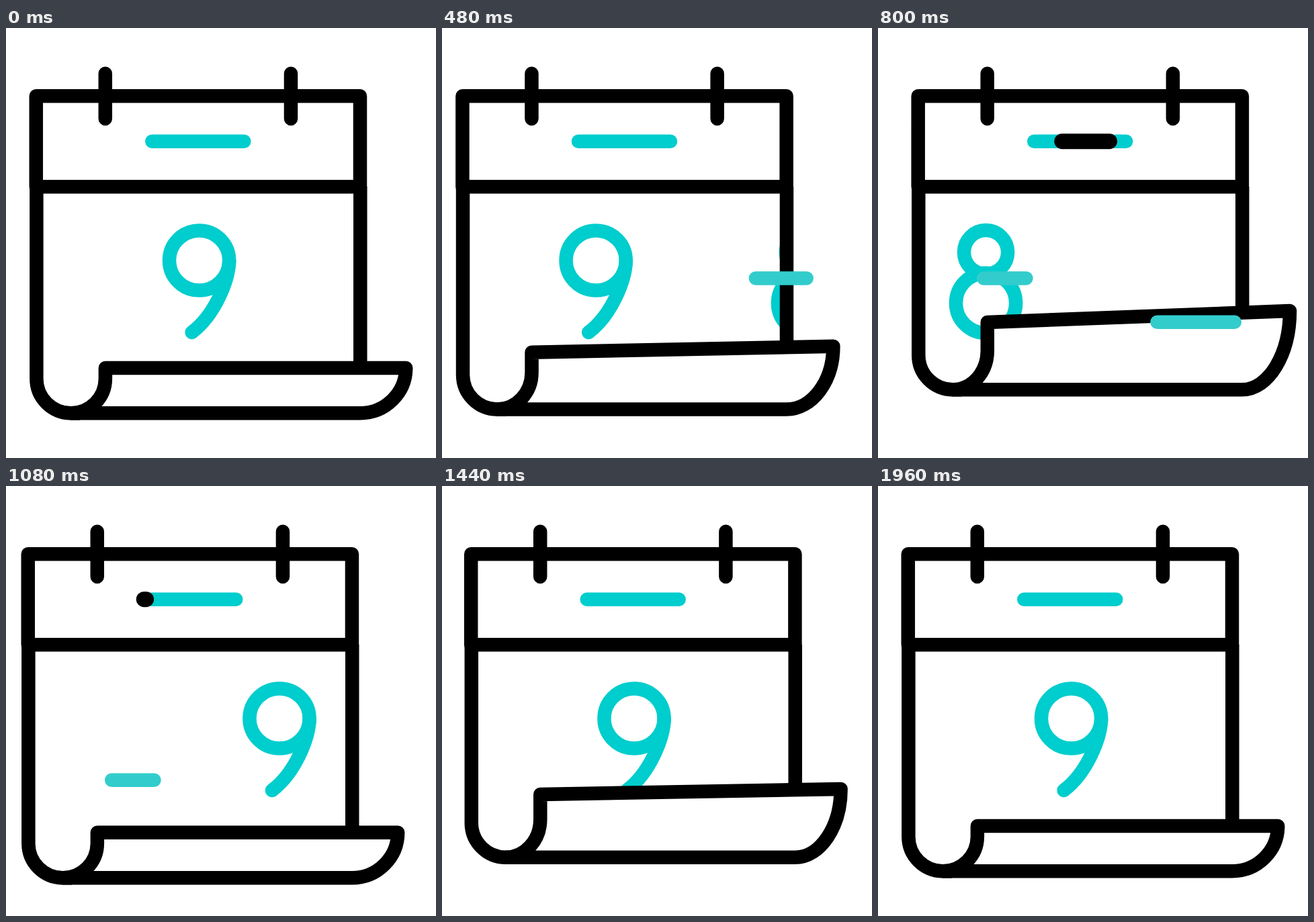
An HTML page for the animation above (2.88 s loop, 640x640 px).

```html
<!DOCTYPE html>
<html lang="en">
<head>
<meta charset="utf-8">
<title>Calendar</title>
<style>
  html, body { margin: 0; width: 100%; height: 100%; overflow: hidden; background: #fff; }
  svg { display: block; width: 100%; height: 100%; }
  .ink, .accent, .dash { fill: none; stroke-width: 20.5; stroke-linecap: round; stroke-linejoin: round; }
  .ink { stroke: #000; }
  .accent { stroke: #00cdcd; }
  .dash { stroke: #3cc; }
</style>
</head>
<body>
<svg viewBox="0 0 640 640">
  <defs>
    <clipPath id="page"><rect x="44.8" y="236" width="482.4" height="360"/></clipPath>
    <g id="nine">
      <circle cx="287.6" cy="346" r="44.6"/>
      <path d="M332.2 346C332 375 311 427 276.6 453"/>
    </g>
  </defs>
  <g id="calendar">
    <g clip-path="url(#page)">
      <g class="accent">
        <use id="leaving" href="#nine"/>
        <g id="eight">
          <circle cx="287.6" cy="333.7" r="32.6"/>
          <circle cx="287.6" cy="409.4" r="44.6"/>
        </g>
        <use id="arriving" href="#nine"/>
      </g>
    </g>
    <path id="sides" class="ink" style="stroke-linecap:butt"/>
    <path id="flap" class="ink" style="fill:#fff"/>
    <path class="ink" d="M44.8 101.3H527V236.2H44.8ZM147.8 67.7V134.9M424 67.7V134.9"/>
    <path class="accent" d="M217.3 168.7H354.3"/>
    <path id="marker" class="ink" style="stroke-width:23"/>
  </g>
  <path id="upper" class="dash"/>
  <path id="lower" class="dash"/>
</svg>
<script>
const LOOP = 2880, STEP = 40;
const el = id => document.getElementById(id);
const smooth = u => u * u * (3 - 2 * u);

// Eased value at time t through [time, value] keys.
function track(t, ...keys) {
  if (t <= keys[0][0]) return keys[0][1];
  for (let i = 1; i < keys.length; i++) {
    const [t0, a] = keys[i - 1], [t1, b] = keys[i];
    if (t < t1) return a + (b - a) * smooth((t - t0) / (t1 - t0));
  }
  return keys[keys.length - 1][1];
}

const moveX = (id, x) => el(id).setAttribute('transform', `translate(${x.toFixed(2)} 0)`);
const setPath = (id, d) => el(id).setAttribute('d', d);

// A line that grows from x0 towards x1 while its tail follows.
function streak(id, y, x0, x1, t, head, tail) {
  const a = track(t, [head[0], x0], [head[1], x1]);
  const b = track(t, [tail[0], x0], [tail[1], x1]);
  setPath(id, b - a > 0.3 ? `M${b} ${y}H${a}` : '');
}

function drawSheet(t) {
  const lift = (first, second) =>
    track(t, [290, 0], [700, first], [1095, 0], [1520, second], [1960, 0]);
  const bottom = 573.2 + track(t, [0, 0], [290, 24.7], [700, -43.5], [1095, 10.3], [1520, -23.6], [1960, 0]);
  const leftLift = lift(39.3, 29.2);
  const left = bottom - 67.3 - leftLift;
  const height = 67.3 + lift(59.5, 38);
  const tip = 595.2 + lift(3.4, 0);
  const k = 0.5523, r = 51.2, rise = r + leftLift * 0.2;

  setPath('sides', `M527.3 236V${left}M45.4 236V${bottom - r}` +
    `A${r} ${r} 0 0 0 96.6 ${bottom}H110`);
  setPath('flap', `M147.9 ${left}L${tip} ${bottom - height}` +
    `C${tip} ${bottom - height * (1 - k)} ${527 + (tip - 527) * k} ${bottom} 527 ${bottom}H96.6` +
    `C${96.6 + r * k} ${bottom} 147.9 ${bottom - rise * (1 - k)} 147.9 ${bottom - rise}Z`);
}

function draw(t) {
  moveX('calendar', track(t, [0, 0], [273, 32.7], [566, -26.7], [866, 20.8], [1126, -15], [1520, 0]));
  moveX('leaving', track(t, [0, 0], [275, 33], [1004, -367]));
  moveX('eight', track(t, [368, 320], [1030, -320]));
  moveX('arriving', track(t, [710, 320], [1371, 0]));
  drawSheet(t);
  streak('marker', 168.7, 354.3, 217.3, t, [521, 961], [681, 1121]);
  streak('upper', 372.4, 543, 157.2, t, [366, 766], [473, 913]);
  streak('lower', 437.8, 543, 157.2, t, [646, 1046], [753, 1193]);
}

const start = performance.now();
function tick() {
  const t = (performance.now() - start) % LOOP;
  draw(Math.floor(t / STEP) * STEP);
  requestAnimationFrame(tick);
}
draw(0);
requestAnimationFrame(tick);
</script>
</body>
</html>
```
